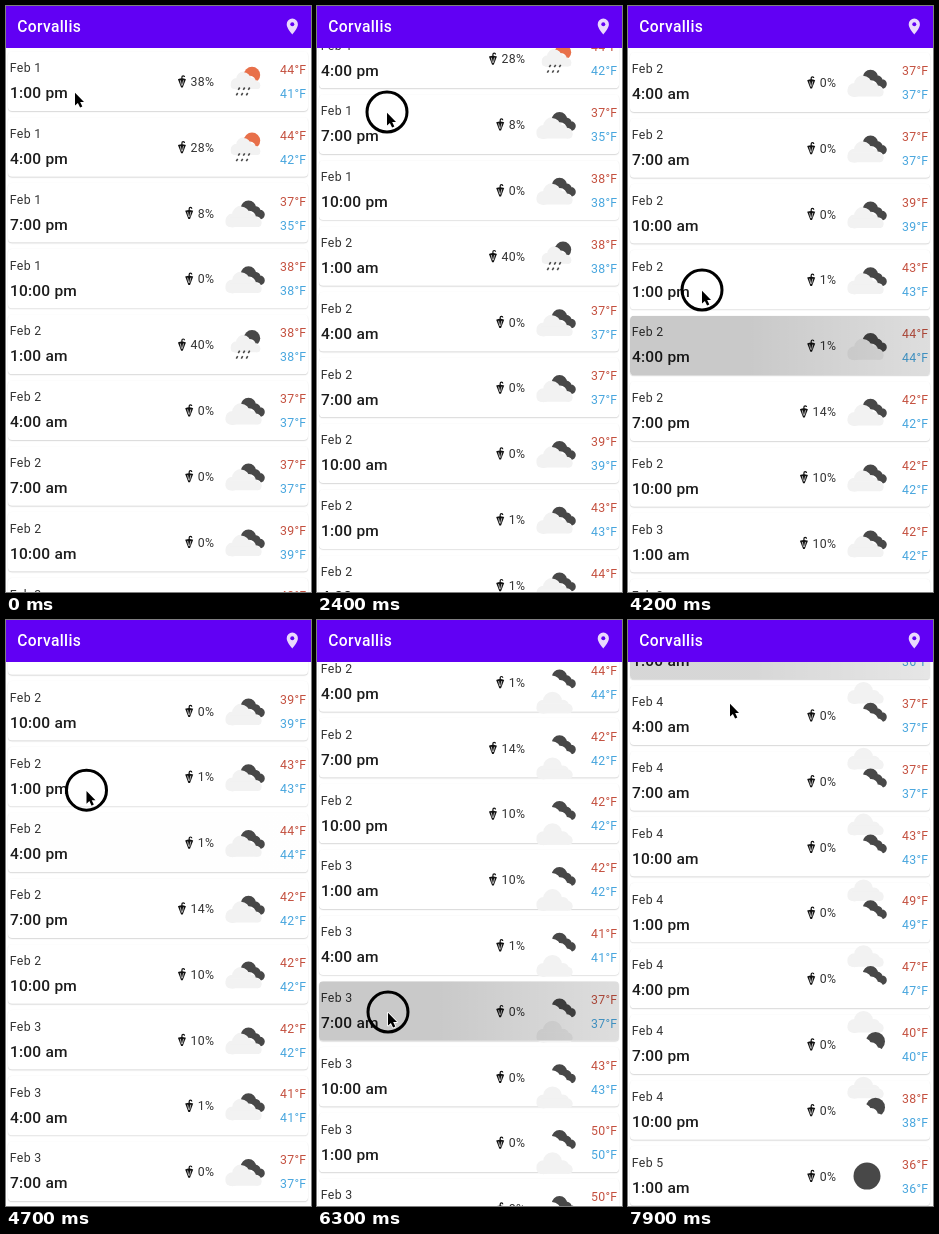
Animation, 305 px wide and 586 px high, one loop 8 s. Source, as an HTML page with a canvas:

```html
<!DOCTYPE html>
<html lang="en">
<head>
<meta charset="utf-8">
<title>Forecast list</title>
<style>
html, body { margin: 0; width: 100%; height: 100%; overflow: hidden; background: #fff; }
canvas { display: block; width: 305px; height: 586px; }
</style>
</head>
<body>
<canvas id="stage"></canvas>
<script>
const W = 305, H = 586, LOOP = 8000, STEP = 100;
const PITCH = 65.8, FIRST = 62, BAR = 42;
const PURPLE = '#6100f4', DARK = '#484848', SUN = '#e8704a', CLOUD = '#f2f2f2';

const canvas = document.getElementById('stage');
const ctx = canvas.getContext('2d');
const dpr = window.devicePixelRatio || 1;
canvas.width = W * dpr;
canvas.height = H * dpr;

// Smooth monotone curve through [position, value] points
function track(points) {
  const last = points.length - 1;
  const slope = i => (points[i + 1][1] - points[i][1]) / (points[i + 1][0] - points[i][0]);
  const tangent = i => {
    if (i === 0 || i === last) return 0;
    const a = slope(i - 1), b = slope(i);
    return a * b <= 0 ? 0 : 2 * a * b / (a + b);
  };
  return t => {
    if (t <= points[0][0]) return points[0][1];
    if (t >= points[last][0]) return points[last][1];
    let i = 0;
    while (t > points[i + 1][0]) i++;
    const [t0, a] = points[i], [t1, b] = points[i + 1];
    const d = t1 - t0, u = (t - t0) / d, v = 1 - u;
    return a * v * v * (1 + 2 * u) + b * u * u * (3 - 2 * u)
      + d * u * v * (tangent(i) * v - tangent(i + 1) * u);
  };
}

// Weather curves over the row index; a row is three hours, from Feb 1, 1 pm
const warmth = track([[1, 44], [2, 37], [3.5, 38.4], [5.5, 36.5], [9, 44], [10, 42], [12, 42],
  [13, 41], [14, 37], [16.3, 51], [20, 36.4], [22, 37.4], [24.3, 49.6], [26, 40.2], [29, 35]]);
const showers = track([[3, 0], [4, 40], [5, 0], [7, .4], [9, 1], [10, 14], [11, 10],
  [12, 10], [13, 1], [15, 0]]);

function forecast(i) {
  const hour = 13 + i * 3, h = hour % 24;
  const high = Math.round(warmth(i));
  const rain = Math.round(Math.max(38 - 5 * i * (i + 1), showers(i)));
  return {
    date: 'Feb ' + (1 + Math.floor(hour / 24)),
    time: (h % 12 || 12) + ':00 ' + (h < 12 ? 'am' : 'pm'),
    high,
    low: i < 3 ? high - (i ? 2 : 3) : high,
    rain,
    sky: rain > 20 ? 'rain' : i < 26 ? 'broken' : i < 28 ? 'few' : 'clear',
    disc: h > 6 && h < 18 ? SUN : DARK
  };
}
const rows = Array.from({ length: 30 }, (_, i) => forecast(i));

const scrollAt = track([[1850, 0], [2400, 88.5], [3000, 255], [3800, 322], [4200, 328],
  [4700, 445], [5200, 543.7], [6000, 605.5], [6300, 605.5], [6850, 880], [7400, 1005], [7900, 1361.8]]);
const driftAt = track([[5300, 0], [5700, 17], [6400, 17], [7900, -26]]);

const path = [[200, 69, 86], [1000, 84, 84], [1300, 84, 84], [1850, 76, 195], [2400, 70, 106],
  [3800, 76, 318], [4200, 74, 284], [5200, 87, 86], [6100, 71, 392], [6300, 71, 392],
  [6850, 80, 100], [7400, 78, 384], [7900, 102, 83]];
const pointerX = track(path.map(([t, x]) => [t, x]));
const pointerY = track(path.map(([t, , y]) => [t, y]));

const presses = [
  { row: 0, down: 1250, up: 2450 },
  { row: 9, down: 3960, up: 5250 },
  { row: 14, down: 6150, up: 6850 },
  { row: 20, down: 7450, up: 7850 }
];

function text(str, x, y, size, color, { weight = 400, align = 'left', gap = .35 } = {}) {
  ctx.font = `${weight} ${size}px Roboto, sans-serif`;
  ctx.letterSpacing = gap + 'px';
  ctx.textAlign = align;
  ctx.fillStyle = color;
  ctx.fillText(str, x, y);
}

function discs(color, ...list) {
  ctx.fillStyle = color;
  ctx.beginPath();
  for (const [x, y, r] of list) {
    ctx.moveTo(x + r, y);
    ctx.arc(x, y, r, 0, Math.PI * 2);
  }
  ctx.fill();
}

function card(y) {
  ctx.beginPath();
  ctx.roundRect(2, y - 16.5, 300, 59.5, 4);
}

function cloud(x, y, k) {
  ctx.save();
  ctx.translate(x, y);
  ctx.scale(k, k);
  discs(CLOUD, [-11, 4, 7], [-2, -1.5, 9.5], [8.5, 3, 6], [14, 6.5, 4]);
  ctx.beginPath();
  ctx.roundRect(-18, 1, 36, 9.5, 4.7);
  ctx.fill();
  ctx.restore();
}

// Keeps what follows out of the outline of a cloud at (x, y)
function clipBehind(x, y, k) {
  for (const [dx, dy, r] of [[-2.5, -1.5, 8.7], [5.5, 1.2, 7], [12.5, 5, 5.4]]) {
    ctx.beginPath();
    ctx.rect(0, -H, W, H * 3);
    ctx.arc(x + dx * k, y + dy * k, r * k, 0, Math.PI * 2);
    ctx.clip('evenodd');
  }
}

function drops(y) {
  ctx.strokeStyle = DARK;
  ctx.lineWidth = 1.6;
  ctx.beginPath();
  for (let i = 0; i < 6; i++) {
    const low = i > 2, x = 233 + i % 3 * 5 - low * 2, dy = y + 20.7 + low * 5.5;
    ctx.moveTo(x + .7, dy - 1.2);
    ctx.lineTo(x - .7, dy + 1.2);
  }
  ctx.stroke();
}

function skyIcon({ sky, disc }, y, drift) {
  if (sky === 'clear') return discs(DARK, [239, y + 13.5, 13.5]);
  const wet = sky === 'rain';
  const x = wet ? 239.5 : 237.5, cy = y + (wet ? 12.5 : 17), k = wet ? .82 : 1;
  cloud(x, cy + drift, k);
  ctx.save();
  clipBehind(x, cy, k);
  if (wet) discs(disc, [246, y + 7, 8.2]);
  else if (sky === 'few') discs(DARK, [247.5, y + 10.5, 9.5]);
  else discs(DARK, [242.5, y + 8.5, 7.7], [249, y + 12, 5.7], [254, y + 15, 4.8]);
  ctx.restore();
  if (wet) drops(y);
}

function umbrella(x, y) {
  ctx.fillStyle = ctx.strokeStyle = '#111';
  ctx.beginPath();
  ctx.moveTo(x - 4, y - 2.3);
  ctx.quadraticCurveTo(x, y - 4, x + 4, y - 2.3);
  ctx.lineTo(x + .8, y + 6);
  ctx.lineTo(x - .8, y + 6);
  ctx.fill();
  ctx.lineWidth = 1.2;
  ctx.beginPath();
  ctx.moveTo(x, y - 2);
  ctx.lineTo(x, y - 4.2);
  ctx.arc(x + 1.3, y - 4.4, 1.3, Math.PI, 0);
  ctx.stroke();
  ctx.strokeStyle = '#fff';
  ctx.lineWidth = .7;
  ctx.beginPath();
  for (const side of [-1, 1]) {
    ctx.moveTo(x + side * 1.6, y - 1.2);
    ctx.lineTo(x + side * .4, y + 4);
  }
  ctx.stroke();
}

function ripple(down, t, y) {
  const age = t - down;
  const fade = Math.min(1, 1 - (age - 350) / 400);
  if (age <= 0 || fade <= 0) return;
  ctx.save();
  card(y);
  ctx.clip();
  ctx.globalAlpha = fade;
  const u = age / 130, x = pointerX(down);
  if (u < 1) {
    discs('rgba(0,0,0,.19)', [x + (152 - x) * u, y + 13, 30 + 165 * u]);
  } else {
    const shade = ctx.createLinearGradient(0, 0, W, 0);
    shade.addColorStop(.4, 'rgba(0,0,0,.21)');
    shade.addColorStop(1, 'rgba(0,0,0,.13)');
    ctx.fillStyle = shade;
    ctx.fill();
  }
  ctx.restore();
}

function drawRow(item, i, y, drift, t) {
  ctx.save();
  ctx.shadowColor = 'rgba(0,0,0,.2)';
  ctx.shadowBlur = 1.2 * dpr;
  ctx.shadowOffsetY = .7 * dpr;
  ctx.fillStyle = '#fff';
  card(y);
  ctx.fill();
  ctx.restore();

  const right = { align: 'right' };
  text(item.date, 3.8, y + 4.2, 12.3, '#333');
  text(item.time, 4, y + 30.2, 15.5, '#1c1c1c', { weight: 500, gap: .2 });
  text(item.rain + '%', 208.3, y + 18, 12.3, '#333', right);
  umbrella(199.8 - ctx.measureText(item.rain + '%').width, y + 13.5);
  skyIcon(item, y, drift);
  text(item.high + '°F', 300.5, y + 6, 12.3, '#c4503f', right);
  text(item.low + '°F', 300.5, y + 30, 12.3, '#48a6de', right);
  presses.filter(p => p.row === i).forEach(p => ripple(p.down, t, y));
}

function drawBar() {
  ctx.fillStyle = PURPLE;
  ctx.fillRect(0, 0, W, BAR);
  text('Corvallis', 11.3, 26.3, 15.6, '#fff', { weight: 500, gap: .35 });

  ctx.fillStyle = '#ead9fd';
  ctx.beginPath();
  ctx.arc(286.3, 18.2, 5.6, Math.PI, 0);
  ctx.bezierCurveTo(291.9, 22, 288, 26, 286.3, 28.4);
  ctx.bezierCurveTo(284.6, 26, 280.7, 22, 280.7, 18.2);
  ctx.fill();
  discs(PURPLE, [286.3, 18.2, 2]);
}

const arrow = new Path2D('M0 0V15L3.4 11.9 6 17.3 8.6 16.1 6.1 10.9H10.6Z');

function drawPointer(t) {
  const x = pointerX(t), y = pointerY(t);
  if (presses.some(p => t >= p.down && t < p.up)) {
    ctx.strokeStyle = '#000';
    ctx.lineWidth = 3;
    ctx.beginPath();
    ctx.arc(x, y, 20, 0, Math.PI * 2);
    ctx.stroke();
  }
  ctx.save();
  ctx.translate(x, y + .8);
  ctx.scale(.85, .85);
  ctx.lineJoin = 'round';
  ctx.strokeStyle = '#fff';
  ctx.lineWidth = 2;
  ctx.stroke(arrow);
  ctx.fillStyle = '#000';
  ctx.fill(arrow);
  ctx.restore();
}

function draw(t) {
  ctx.setTransform(dpr, 0, 0, dpr, 0, 0);
  ctx.fillStyle = '#fff';
  ctx.fillRect(0, 0, W, H);
  const scroll = scrollAt(t), drift = driftAt(t);
  rows.forEach((item, i) => {
    const y = FIRST + i * PITCH - scroll;
    if (y > -50 && y < H + 50) drawRow(item, i, y, drift, t);
  });
  drawBar();
  drawPointer(t);
}

const origin = performance.now();
function tick() {
  const t = (performance.now() - origin) % LOOP;
  draw(Math.floor(t / STEP) * STEP);
  requestAnimationFrame(tick);
}
tick();
</script>
</body>
</html>
```
